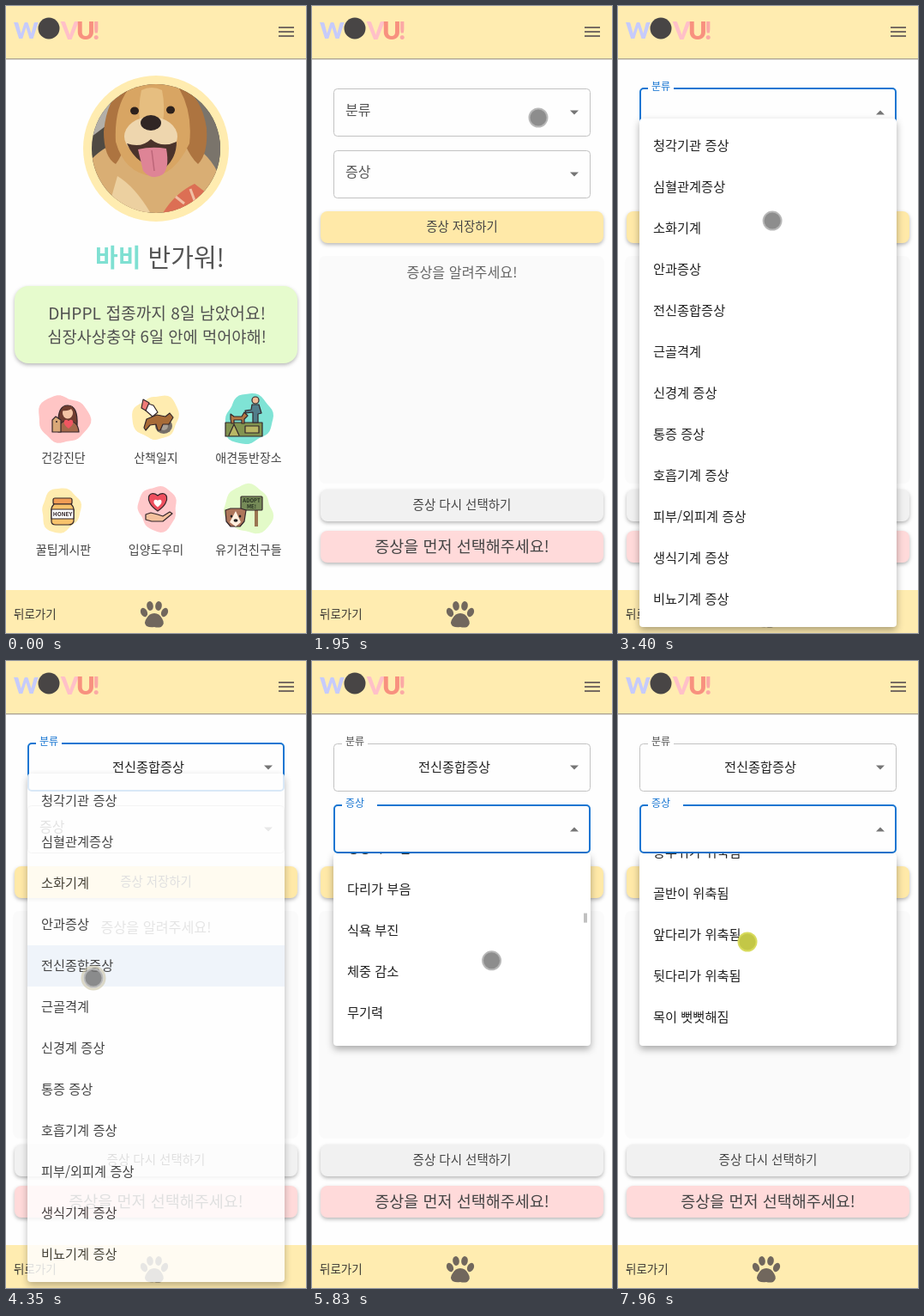
Recreate the animation shown at these times as an HTML page. Size 350 px wide and 730 px high, loop 8000 ms.

```html
<!DOCTYPE html>
<html lang="ko">
<head>
<meta charset="utf-8">
<title>Pet care app</title>
<style>
  html, body { margin: 0; width: 100%; height: 100%; overflow: hidden; background: #fefefe; }
  svg { display: block; width: 350px; height: 730px; }
  text { font-family: "Noto Sans CJK KR", "Noto Sans CJK", "Noto Sans", sans-serif; white-space: pre; }
  .logo text { font-family: Lato, sans-serif; font-weight: 900; }
  .raised { filter: drop-shadow(0 2px 2px rgba(0,0,0,.28)); }
  .paper { filter: drop-shadow(0 4px 4px rgba(0,0,0,.32)); }
</style>
</head>
<body>
<svg id="stage" viewBox="0 0 350 730"></svg>
<script>
const LOOP = 8000, BLUE = '#1976d2', CREAM = '#ffecb0';
const stage = document.getElementById('stage');
const $ = id => document.getElementById(id);
const set = (el, attrs) => { for (const k in attrs) el.setAttribute(k, attrs[k]); };

// Markup helpers; text is placed by its visual middle
const text = (s, x, cy, size, fill = '#444', extra = '') =>
  `<text x="${x}" y="${cy + size * .37}" font-size="${size}" fill="${fill}" ${extra}>${s}</text>`;
const mid = (s, x, cy, size, fill, extra = '') => text(s, x, cy, size, fill, 'text-anchor="middle" ' + extra);
const box = (x, y, w, h, fill, r = 0, extra = '') =>
  `<rect x="${x}" y="${y}" width="${w}" height="${h}" rx="${r}" fill="${fill}" ${extra}/>`;
const oval = (x, y, rx, ry, fill, extra = '') =>
  `<ellipse cx="${x}" cy="${y}" rx="${rx}" ry="${ry}" fill="${fill}" ${extra}/>`;
const path = (d, fill, extra = '') => `<path d="${d}" fill="${fill}" ${extra}/>`;
const group = (id, body, extra = '') => `<g id="${id}" ${extra}>${body}</g>`;
const button = (y, fill, label, size) =>
  box(10, y, 330, 37, fill, 8, 'class="raised"') + mid(label, 175, y + 18, size);

function blob(x, y, rx, ry, fill, seed) {
  let d = '';
  for (let i = 0; i < 48; i++) {
    const a = i / 48 * Math.PI * 2;
    const r = .95 + .07 * Math.sin(2 * a + seed) + .05 * Math.sin(3 * a + 2 * seed) + .03 * Math.sin(7 * a + seed);
    d += (i ? 'L' : 'M') + (x + rx * r * Math.cos(a)).toFixed(1) + ' ' + (y + ry * r * Math.sin(a)).toFixed(1);
  }
  return path(d + 'Z', fill);
}

const INK = 'stroke="#33262a" stroke-width="1.2" stroke-linejoin="round" stroke-linecap="round"';
const heart = (x, y, s, fill, extra = '') =>
  path('M0 4C-9-2-5-9 0-5C5-9 9-2 0 4Z', fill, `transform="translate(${x} ${y}) scale(${s})" ${extra}`);

const photo = '<clipPath id="round"><circle cx="175" cy="166" r="75"/></clipPath><g clip-path="url(#round)">' +
  box(100, 90, 150, 152, '#4f4a43') +
  path('M100 90H140L116 140L100 152Z', '#b3afa8') +
  path('M214 90H250V190H225Z', '#7a746b') +
  path('M100 178Q118 160 134 160H214Q238 172 250 200V245H100Z', '#d9ae74') +
  path('M140 92Q118 106 114 146Q114 176 128 184Q142 166 148 120Z', '#ad7440') +
  path('M202 92Q228 104 234 142Q236 172 224 184Q206 168 200 124Z', '#ad7440') +
  path('M142 98Q170 80 202 96Q218 124 214 160Q196 198 170 198Q138 194 128 158Q126 120 142 98Z', '#d8a563') +
  path('M158 98Q170 92 182 98Q186 118 183 134H156Q154 116 158 98Z', '#e6be80') +
  oval(169, 152, 31, 23, '#eed6ae') +
  path('M141 160Q158 166 169 155Q182 166 199 158Q199 176 186 188Q154 190 141 160Z', '#4b332b') +
  path('M154 167Q170 163 187 166Q191 188 183 196Q170 204 160 192Z', '#de8496') +
  path('M170 168L173 192', 'none', 'stroke="#bd6679" stroke-width="1.5"') +
  oval(169, 136, 12, 9, '#302624') +
  oval(150, 122, 5, 4.5, '#2d211c') + oval(192, 121, 5, 4.5, '#2d211c') +
  path('M130 198Q150 210 168 240H118Z', '#ecd0a0') +
  path('M183 241Q197 218 220 207L242 224L219 247Z', '#dc6f54') +
  path('M198 222L208 230M215 213L221 229', 'none', 'stroke="#f0bfa4" stroke-width="3"') + '</g>';

const icons =
  blob(67, 481, 30, 30, '#ffc5c5', 1) +
  path('M61 487Q60 465 72 465Q84 465 83 488Z', '#703d30', INK) + oval(72, 474, 6, 6.5, '#f5c5a5') +
  path('M66 471Q73 472 77 468V466H67Z', '#703d30') +
  path('M61 496Q61 483 72 483Q84 483 85 496Z', '#a5694c', INK) +
  path('M54 496V482L58 478L64 482V496Z', '#d9a878', INK) + oval(59, 484, 1, 1, '#33262a') +
  heart(73, 488, 1, '#ef5661') +

  blob(175, 479, 27, 28, CREAM, 2.2) +
  oval(184, 489, 10, 9, '#756e68') + oval(184, 489, 5, 5, '#a9a096') +
  path('M163 462L172 465L177 473L171 478L163 471Z', '#fff', INK) +
  path('M160 458L167 462L163 471L158 468Z', '#ef7b77', INK) +
  path('M164 481L176 476L186 478L191 474L195 479L190 487L183 487L180 494H177L175 487L168 488L163 494L161 491Z', '#a86b37', INK) +

  blob(283, 481, 30, 30, '#7fe3d5', 3.5) +
  box(256, 485, 43, 16, '#829450', 0, INK) + path('M260 500L266 487L272 500M279 489H295V497H279Z', '#b9b765', INK) +
  path('M262 481V475L266 478H275L278 473L282 477L278 481V486H275V482H266V486H263Z', '#b47845', INK) +
  oval(291, 459, 4, 4, '#f1bd98', INK) +
  path('M287 464H295L298 474L294 475V485H288V473L280 474L279 471L286 470Z', '#517e8b', INK) +

  blob(64, 587, 25, 26, CREAM, 4) +
  box(55, 573, 22, 7, '#f19d55', 2, INK) +
  path('M56 580H76Q80 584 79 590V600Q78 604 73 604H58Q53 604 53 600V589Q52 584 56 580Z', '#f8c36c', INK) +
  box(53, 586, 26, 11, '#fff', 0, INK) + mid('HONEY', 66, 591.5, 6.5, '#33262a', 'font-weight="700"') +

  blob(177, 585, 25, 26, '#ffc8ca', 5) +
  heart(177, 580, 2, '#ee4f5e', 'stroke="#33262a" stroke-width=".6"') + heart(177, 580, .85, '#fff') +
  path('M163 592L169 590L177 592L183 594L191 589L194 591L183 600H170L163 598Z', '#f4c09c', INK) +

  blob(283, 586, 30, 29, '#e3fac8', 6) +
  box(290, 584, 4, 22, '#9a7552') +
  box(274, 571, 25, 16, '#768b58', 1, INK) +
  mid('ADOPT', 286.5, 576, 6, '#263021', 'font-weight="700"') + mid('ME!', 286.5, 582.5, 6, '#263021', 'font-weight="700"') +
  path('M256 587L262 585H274L280 587L278 600L273 606H262L257 600Z', '#ad765b', INK) +
  path('M268 588L274 601L268 606L261 601Z', '#fff0df') +
  oval(263, 594, 1.3, 1.5, '#222') + oval(273, 594, 1.3, 1.5, '#222') + oval(268, 599, 2.5, 1.8, '#222');

const captions = [['건강진단', '산책일지', '애견동반장소'], ['꿀팁게시판', '입양도우미', '유기견친구들']];
const home =
  `<circle cx="175" cy="166" r="85" fill="${CREAM}"/>` + photo +
  mid('<tspan fill="#7fe0d2" font-weight="700">바비</tspan> 반가워!', 179.5, 293, 29, '#555', 'font-weight="500"') +
  box(10, 326, 330, 90, '#e6fbcd', 16, 'class="raised"') +
  mid('DHPPL 접종까지 8일 남았어요!', 176, 358, 19.2, '#505050') +
  mid('심장사상충약 6일 안에 먹어야해!', 176, 385, 18.7, '#505050') +
  icons + captions.map((row, r) => row.map((s, c) => mid(s, 67 + 108 * c, 525.5 + 107 * r, 14)).join('')).join('');

// Outlined select field
const field = (id, y, label, gap) => group(id,
  box(25, y, 300, 57, 'none', 4, 'class="edge"') +
  box(35, y - 2, gap, 5, '#fefefe', 0, 'class="gap"') +
  `<g class="label">${text(label, 0, 0, 16)}</g>` +
  path('M-5-2.5H5L0 2.5Z', '#757575', 'class="arrow"') +
  `<g class="value">${mid('전신종합증상', 166, y + 28, 15.25, '#222')}</g>`);

const form =
  field('kind', 95, '분류', 30) + field('sign', 167, '증상', 41) +
  button(239, '#ffe9a8', '증상 저장하기', 14.4) +
  box(8, 291, 333, 265, '#fafafa', 8) + mid('증상을 알려주세요!', 175, 310, 16.2, '#666') +
  button(563, '#f1f1f1', '증상 다시 선택하기', 14.5) +
  button(611, '#ffdada', '증상을 먼저 선택해주세요!', 18.5);

const kinds = ['청각기관 증상', '심혈관계증상', '소화기계', '안과증상', '전신종합증상', '근골격계',
  '신경계 증상', '통증 증상', '호흡기계 증상', '피부/외피계 증상', '생식기계 증상', '비뇨기계 증상'];
const head = ['떨림', '발열', '낮은 체온', '쉽게 지침', '탈수'];
const filler = ['식욕 부진', '체중 감소', '무기력', '체중 증가', '운동을 싫어함', '복부가 부음', '성장이 느림', '다리가 부음'];
const tail = ['흉부가 위축됨', '등부위가 위축됨', '골반이 위축됨', '앞다리가 위축됨', '뒷다리가 위축됨', '목이 뻣뻣해짐', '몸이 뻣뻣해짐'];
const signs = [...head, ...Array.from({ length: 38 }, (_, i) => filler[i % filler.length]), ...tail];
const rows = (list, top) => list.map((s, i) => text(s, 41, top + 31 + 48 * i, 15.25, '#222')).join('');

const menus =
  group('kindMenu', box(25, 131, 300, 592, '#fff', 4, 'class="paper"') +
    box(25, 331, 300, 48, '#edf3fb', 0, 'id="picked"') + rows(kinds, 131)) +
  group('signMenu', box(25, 224, 300, 224, '#fff', 4, 'class="paper"') +
    '<clipPath id="view"><rect x="25" y="224" width="300" height="224" rx="4"/></clipPath>' +
    `<g clip-path="url(#view)">${group('list', rows(signs, 224))}</g>` +
    box(317, 228, 4, 11, '#c1c1c1', 0, 'id="thumb"'));

const bars =
  box(0, 0, 350, 61, CREAM) + box(0, 61, 350, 1, '#aaa292') + box(0, 62, 350, 1, '#e2e0da') +
  `<g class="logo">${text('W', 9, 28, 27, '#c6cbfb')}<circle cx="50" cy="26" r="12.5" fill="#484545"/>` +
  text('V', 64, 28, 29, '#ffc0c8') + text('U', 82, 28, 29, '#f8917f') + text('!', 101, 28, 29, '#fba9a5') + '</g>' +
  [24, 29, 34].map(y => box(318, y, 18, 2, '#776c62')).join('') +
  box(0, 680, 350, 50, CREAM) + text('뒤로가기', 9, 708.5, 13.5, '#3c3933') +
  path('M173 707Q179 707 182 713Q186 719 181 723Q177 724 173 723Q168 724 164 722Q160 718 164 713Q167 707 173 707Z', '#71675d') +
  [[161, 706, -25], [168, 698.5, -8], [178, 698.5, 8], [185, 706, 25]].map(([x, y, a]) =>
    oval(x, y, 3.8, 5.4, '#71675d', `transform="rotate(${a} ${x} ${y})"`)).join('');

stage.innerHTML = box(0, 0, 350, 730, '#fefefe') + group('home', home) + group('form', form) + bars + menus +
  group('cursor', '<circle id="ring" fill="none" stroke="#cfc9ae" stroke-width="3"/><circle id="dot" r="10.5" stroke-width="2"/>');

// Timing
const OPEN1 = 2178, PICK = 4270, OPEN2 = 4920;
const clicks = [1200, 2108, 4200, 4850, 7930];
const route = [[460, 191, 487], [700, 84, 470], [810, 69, 476], [1470, 68, 476], [1950, 264, 130], [2150, 268, 132],
  [2370, 267, 150], [2710, 205, 172], [2840, 205, 172], [3600, 175, 266], [4150, 102, 369], [4400, 102, 369],
  [4820, 213, 200], [4930, 213, 206], [5090, 213, 291], [5360, 213, 300], [6110, 208, 371], [7130, 208, 371],
  [7740, 147, 328], [7890, 151, 327]];
const scroll = [[5330, 0], [5500, 330], [5700, 930], [5950, 1700], [6110, 1940], [6420, 1940], [6730, 2094], [6870, 2145]];

const clamp = v => Math.min(1, Math.max(0, v));
const smooth = u => u * u * (3 - 2 * u);

function track(keys, t, ease = u => u) {
  const i = keys.findIndex(k => k[0] > t);
  if (i < 0) return keys[keys.length - 1].slice(1);
  if (i === 0) return keys[0].slice(1);
  const a = keys[i - 1], b = keys[i], u = ease((t - a[0]) / (b[0] - a[0]));
  return a.slice(1).map((v, j) => v + (b[j + 1] - v) * u);
}

// cubic-bezier(.4, 0, .2, 1)
function standard(x) {
  let lo = 0, hi = 1, s = x;
  for (let i = 0; i < 18; i++) {
    s = (lo + hi) / 2;
    const bx = 1.2 * s * (1 - s) ** 2 + .6 * s * s * (1 - s) + s ** 3;
    if (bx < x) lo = s; else hi = s;
  }
  return x >= 1 ? 1 : smooth(s);
}
const ramp = (t, start, len) => standard(clamp((t - start) / len));

function drawMenu(id, t, top, len, open, close = Infinity) {
  const shown = t >= open && t < close + len;
  const fade = ramp(t, open, len) - ramp(t, close, len);
  const grow = ramp(t, open, len * .72) - ramp(t, close + len * .333, len * .666);
  const sx = .75 + .25 * grow, sy = .5625 + .4375 * grow;
  set($(id), {
    display: shown ? 'inline' : 'none', opacity: fade,
    transform: `translate(175 ${top}) scale(${sx} ${sy}) translate(-175 ${-top})`
  });
}

function drawField(id, t, y, { shrink, focus, open, value }) {
  const part = name => $(id).querySelector('.' + name);
  const line = focus ? 2 : 1, top = focus ? y : y + 1;
  set(part('edge'), {
    x: 25 + line / 2, y: top + line / 2, width: 300 - line, height: y + 57 - top - line,
    stroke: focus ? BLUE : '#c2c2c2', 'stroke-width': line
  });
  set(part('gap'), { transform: `translate(35 0) scale(${shrink} 1) translate(-35 0)` });
  set(part('label'), { transform: `translate(39 ${y + 26 - 27 * shrink}) scale(${1 - .25 * shrink})` });
  set(part('label').firstChild, { fill: focus ? BLUE : shrink ? '#555' : '#777' });
  set(part('arrow'), { transform: `translate(306 ${y + 29}) scale(1 ${open ? -1 : 1})` });
  set(part('value'), { display: value ? 'inline' : 'none' });
}

function drawCursor(t) {
  const [x, y] = track(route, t, smooth);
  set($('cursor'), { display: t < 460 ? 'none' : 'inline', transform: `translate(${x} ${y})` });
  const since = Math.min(...clicks.map(c => t >= c ? t - c : Infinity));
  const down = since < 70, wave = clamp((since - 70) / 120);
  set($('dot'), {
    fill: down ? 'rgba(190,194,55,.92)' : 'rgba(116,116,116,.82)',
    stroke: down ? 'rgba(215,218,90,.95)' : 'rgba(182,182,182,.95)'
  });
  set($('ring'), { r: 11 + 3 * wave, opacity: down || wave >= 1 ? 0 : 1 - .5 * wave });
}

function draw(t) {
  set($('home'), { display: t < 1330 ? 'inline' : 'none' });
  set($('form'), { display: t >= 1470 ? 'inline' : 'none' });
  drawField('kind', t, 95, {
    shrink: ramp(t, OPEN1, 180), focus: t >= OPEN1 && t < OPEN2, open: t >= OPEN1 && t < PICK, value: t >= PICK
  });
  drawField('sign', t, 167, { shrink: ramp(t, OPEN2, 160), focus: t >= OPEN2, open: t >= OPEN2, value: false });
  set($('picked'), { display: t >= PICK ? 'inline' : 'none' });
  drawMenu('kindMenu', t, 131, 375, OPEN1, PICK);
  drawMenu('signMenu', t, 224, 289, OPEN2);
  const [s] = track(scroll, t);
  set($('list'), { transform: `translate(0 ${-s})` });
  set($('thumb'), { y: 228 + s * .0492, display: t < 6870 ? 'inline' : 'none' });
  drawCursor(t);
}

const start = performance.now();
function tick() {
  draw((performance.now() - start) % LOOP);
  requestAnimationFrame(tick);
}
tick();
</script>
</body>
</html>
```
